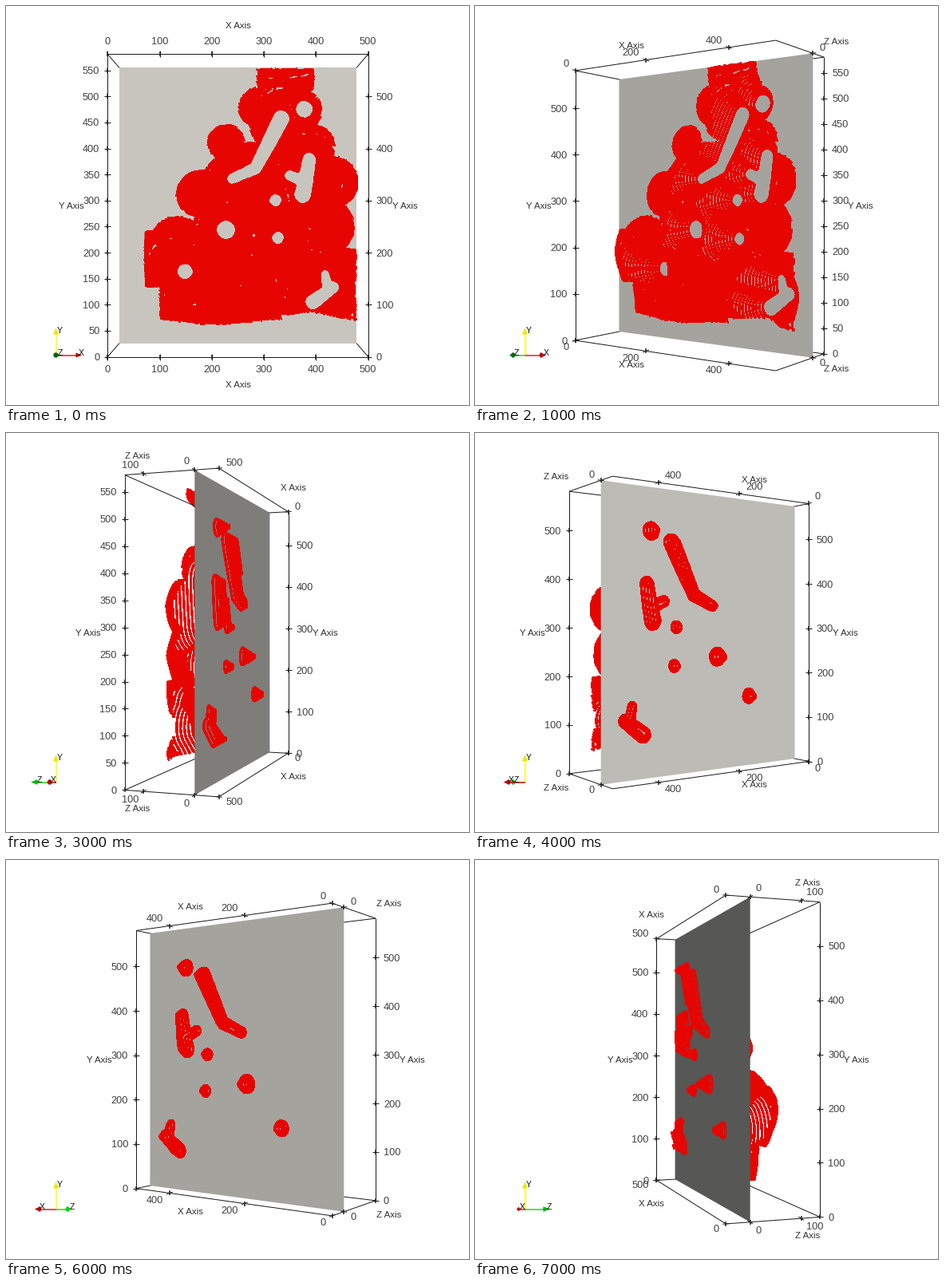
Recreate the animation shown at these times as a matplotlib script. Size 580 by 500 pixels, loop 8 s.

```python
import numpy as np
import matplotlib.pyplot as plt
from matplotlib.animation import FuncAnimation
from matplotlib.collections import LineCollection

W, H, DPI = 580, 500, 100
CX, CY = 290, 249.5
FOCAL, DIST = 933, 1568
HX, HY, ZMIN, ZMAX = 250, 290.5, -46, 138
RED, INK = "#e60500", "#1c1c1c"
LEVEL = 6
STEPS = 8

fig = plt.figure(figsize=(W / DPI, H / DPI), dpi=DPI, facecolor="white")
ax = fig.add_axes([0, 0, 1, 1])


def project(p, angle):
    """Turn the scene about its upright axis and view it in perspective."""
    x, y, z = np.asarray(p, float).T
    c, s = np.cos(angle), np.sin(angle)
    k = FOCAL / (DIST - x * s - z * c)
    return np.column_stack([CX + (x * c - z * s) * k, CY - y * k])


# ---- relief: a union of discs and slabs, sunk by rounded pits --------------
# Shapes are given in screen pixels of the front view.

def capsule(gx, gy, a, b, ra, rb):
    """Distance to a segment whose radius runs from ra to rb."""
    dx, dy = b[0] - a[0], b[1] - a[1]
    t = np.clip(((gx - a[0]) * dx + (gy - a[1]) * dy)
                / (dx * dx + dy * dy + 1e-9), 0, 1)
    return np.hypot(gx - a[0] - t * dx, gy - a[1] - t * dy) - ra - t * (rb - ra)


def chain(gx, gy, pts, ra, rb):
    """Rounded stroke through the points, its radius changing evenly."""
    r = np.linspace(ra, rb, len(pts))
    return np.min([capsule(gx, gy, pts[i], pts[i + 1], r[i], r[i + 1])
                   for i in range(len(pts) - 1)], axis=0)


def disc(gx, gy, x, y, r):
    return np.hypot(gx - x, gy - y) - r


def slab(gx, gy, x0, y0, x1, y1):
    qx = np.abs(gx - (x0 + x1) / 2) - (x1 - x0) / 2
    qy = np.abs(gy - (y0 + y1) / 2) - (y1 - y0) / 2
    return (np.hypot(np.maximum(qx, 0), np.maximum(qy, 0))
            + np.minimum(np.maximum(qx, qy), 0))


DISCS = [(316, 126, 25), (372, 128, 25), (345, 140, 42), (275, 170, 23),
         (385, 175, 27), (408, 220, 32), (400, 276, 35), (318, 252, 84),
         (243, 235, 30), (214, 295, 32)]
SLABS = [(314, 78, 386, 104), (175, 282, 260, 351),
         (192, 300, 345, 395), (330, 303, 438, 389)]
PITS = [([(344, 141), (325, 178), (312, 203), (283, 216)], 10, 6),
        ([(379, 192), (375, 218), (371, 236)], 8, 10),
        ([(355, 212), (374, 220)], 6, 7),
        ([(399, 336), (402, 352)], 5, 6),
        ([(409, 352), (384, 370)], 7, 9)]
ROUND_PITS = [(373, 129, 10), (337, 243, 7), (275, 280, 11),
              (340, 290, 7), (224, 332, 9)]


def to_screen(gx, gy, z):
    k = FOCAL / (DIST - z)
    return CX + gx * k, CY - gy * k, k


def bump(x, centre, width):
    return np.exp(-((x - centre) / width) ** 2)


def rim(x, y):
    """Height of the relief along its outer edge."""
    return (48 + .03 * x + 36 * bump(x, -180, 65) * bump(y, -100, 65)
            - 14 * bump(y, 170, 70))


def blur(a):
    for axis in (0, 1):
        a = (np.roll(a, 1, axis) + 2 * a + np.roll(a, -1, axis)) / 4
    return a


def trace(gx, gy, height, levels):
    """Contour lines as 3D polylines."""
    cs = ax.contour(gx, gy, height, levels)
    lines = [np.column_stack([s, np.full(len(s), z)])
             for z, group in zip(cs.levels, cs.allsegs)
             for s in group if len(s) > 1]
    cs.remove()
    return lines


def build_relief():
    step = 1.25
    gx, gy = np.meshgrid(np.arange(-205, 262, step), np.arange(-262, 292, step))
    sx, sy, k = to_screen(gx, gy, 50)
    swell = 4 * np.cos((sx - 262) / 30) * bump(sy, 400, 25)
    out = np.min([disc(sx, sy, *d) for d in DISCS]
                 + [slab(sx, sy - swell, *b) for b in SLABS], axis=0) / k
    sx, sy, k = to_screen(gx, gy, 0)
    pit = np.min([chain(sx, sy, *p) for p in PITS]
                 + [disc(sx, sy, *d) for d in ROUND_PITS], axis=0) / k - 1.5

    wall = np.where(pit < 0, 1.8, 1.5) * pit
    roof = rim(gx, gy) + 0.55 * np.maximum(-out, 0)
    h = blur(blur(-5 * np.logaddexp(-wall / 5, -roof / 5)))
    h += .5 * np.sin(.21 * gx + .08 * gy) * np.sin(.17 * gy - .05 * gx)
    dy, dx = np.gradient(h, step)
    h = np.where(out < 0, h, np.nan)

    # gentle slopes get closer lines, so that they stay covered
    gentle = np.where(np.hypot(dx, dy) < 1.25, h, np.nan)
    levels = np.arange(-51, ZMAX, LEVEL)
    fine = np.arange(-51, ZMAX, LEVEL / 4)
    lines = trace(gx, gy, h, levels) + trace(gx, gy, gentle, fine[fine > 20])
    return [s for s in lines if s[0, 2] > 0], [s for s in lines if s[0, 2] < 0]


# ---- drawing helpers ------------------------------------------------------

def strokes(segs, color, width, z, smooth=True):
    ax.add_collection(LineCollection(segs, colors=color, linewidths=width * .72,
                                     antialiaseds=smooth, zorder=z),
                      autolim=False)


def label(x, y, s, size=12.7, ha="center", color="#404040"):
    ax.text(x, y, s, fontsize=size * .72, family="Liberation Sans", color=color,
            ha=ha, va="center_baseline", zorder=8)


def title(x, y, s):
    label(x, y, s, 11.5, color="#303030")


def plane_color(angle):
    """Shade of the sheet under key, head, fill and two back lights."""
    c, s = np.cos(angle), np.sin(angle)
    nx, nz = -s * np.sign(c), abs(c)
    key = .112 * nx + .633 * nz
    rest = .419 * nz + max(0, .94 * abs(nx) - .342 * nz) / 3.5
    rgb = key * np.array([184, 178.6, 170]) + rest * np.array([199, 200, 197])
    return np.clip(rgb / 255, 0, 1)


def draw_box(angle):
    edges = []
    for y in (-HY, HY):
        for z in (ZMIN, ZMAX):
            edges.append([(-HX, y, z), (HX, y, z)])
        for x in (-HX, HX):
            edges += [[(x, y, ZMIN), (x, y, 0)], [(x, y, 0), (x, y, ZMAX)]]
    corners = [(x, z) for x in (-HX, HX) for z in (ZMIN, ZMAX)]
    corners.sort(key=lambda q: project([(q[0], 0, q[1])], angle)[0, 0])
    left, right = corners[0], corners[-1]
    for x, z in (left, right):
        edges.append([(x, -HY, z), (x, HY, z)])
    for e in edges:
        near = (e[0][2] + e[1][2]) * np.cos(angle) > 0
        strokes([project(e, angle)], INK, 1, 5 if near else 1)
    return left, right


def tick(x, y, ux, uy):
    strokes([[(x - 4 * ux, y - 4 * uy), (x + 4 * ux, y + 4 * uy)]], INK, 1, 6)
    strokes([[(x, y - 3), (x, y + 3)]], INK, 1.5, 6)


def upright_axis(corner, angle, side, step):
    x, z = corner
    for v in range(0, 581, step):
        px, py = project([(x, v - HY, z)], angle)[0]
        tick(px, py, 1, 0)
        label(px + 10 * side, py, str(v), ha="left" if side > 0 else "right")
    px, py = project([(x, 0, z)], angle)[0]
    title(px + 46 * side, py - .5, "Y Axis")


def level_axis(name, place, values, mid, ends, facing, angle):
    """Labels along the top and bottom edges, pushed out past the near corner."""
    for y, side in ((HY, -1), (-HY, 1)):
        near, far = project([(ends[0][0], y, ends[0][1]),
                             (ends[1][0], y, ends[1][1])], angle)
        u = (near - far) / np.hypot(*(near - far))
        if facing:
            u = np.array([0, side])
        lift = abs(u[1])
        for v, offset in values:
            a, b = place(offset)
            px, py = project([(a, y, b)], angle)[0]
            tick(px, py, *u)
            reach = 20 if v else 12
            label(px + reach * u[0], py + side * (5.5 + 10 * lift) - 1, str(v))
        a, b = place(mid)
        px, py = project([(a, y, b)], angle)[0]
        dx = 0 if facing else 43 * np.sign(u[0])
        dy = 35.5 if facing else 5 + 26 * lift
        title(px + dx, py + side * dy - 1, name)


def draw_labels(i, angle, left, right):
    c, s = np.cos(angle), np.sin(angle)
    facing = abs(s) < .01
    upright_axis(left, angle, -1, 50 if i in (0, 3) else 100)
    upright_axis(right, angle, 1, 50 if i in (1, 2) else 100)
    xn = HX if s > 0 else -HX
    zn, zf = (ZMAX, ZMIN) if c > 0 else (ZMIN, ZMAX)
    step = 100 if abs(c) > .9 else 200 if abs(c) > .5 else 500
    level_axis("X Axis", lambda v: (v, zn),
               [(v, v - HX) for v in range(0, 501, step)],
               0, [(xn, zn), (xn, zf)], facing, angle)
    if not facing:
        marks = (0, 100) if abs(s) > .9 else (0,)
        level_axis("Z Axis", lambda v: (xn, v), [(v, v) for v in marks],
                   44, [(xn, zn), (-xn, zn)], False, angle)


def draw_compass(angle):
    ox, oy = 62, 437
    c, s = np.cos(angle), np.sin(angle)
    strokes([[(ox, oy), (ox, oy - 28)]], "#ffff00", 1.5, 7)
    ax.fill([ox - 3.5, ox + 3.5, ox], [oy - 26, oy - 26, oy - 34],
            color="#f0e600", lw=0, zorder=7)
    label(67, 405.5, "Y", 10.5, color="#101010")
    arms = [(c, s, (.9, .08, .2), (.75, 0, 0), "X"),
            (-s, c, (.1, .85, .1), (0, .65 - .25 * c, 0), "Z")]
    t = np.linspace(0, 2 * np.pi, 24)
    for dx, depth, shaft, tip, name in sorted(arms, key=lambda a: a[1]):
        base, r = ox + 25 * dx, 3.2 if depth > -.9 else 2
        strokes([[(ox, oy), (base, oy)]], [shaft], 1.5, 7)
        ax.fill(base + r * abs(depth) * np.cos(t), oy + r * np.sin(t),
                color=tip, lw=0, zorder=7)
        ax.fill([base, base, ox + 33 * dx], [oy - 3, oy + 3, oy], color=tip,
                lw=0, zorder=7)
        label(67 + 27 * dx, 433.5, name, 10.5, color="#101010")


FRONT, BACK = build_relief()


def draw(i):
    ax.clear()
    ax.set_xlim(-.5, W - .5)
    ax.set_ylim(H - .5, -.5)
    ax.axis("off")
    angle = 2 * np.pi * i / 10
    near, far = (FRONT, BACK) if np.cos(angle) > 0 else (BACK, FRONT)
    strokes([project(s, angle) for s in far], RED, 2.4, 1, False)
    sheet = project([(-HX, -HY, 0), (HX, -HY, 0), (HX, HY, 0), (-HX, HY, 0)], angle)
    ax.fill(*sheet.T, color=plane_color(angle), lw=0, zorder=2)
    strokes([project(s, angle) for s in near], RED, 2.4, 3, False)
    left, right = draw_box(angle)
    draw_labels(i, angle, left, right)
    draw_compass(angle)
    return []


anim = FuncAnimation(fig, draw, frames=STEPS, interval=1000, repeat=True,
                     init_func=lambda: [], blit=False)
plt.show()
```
